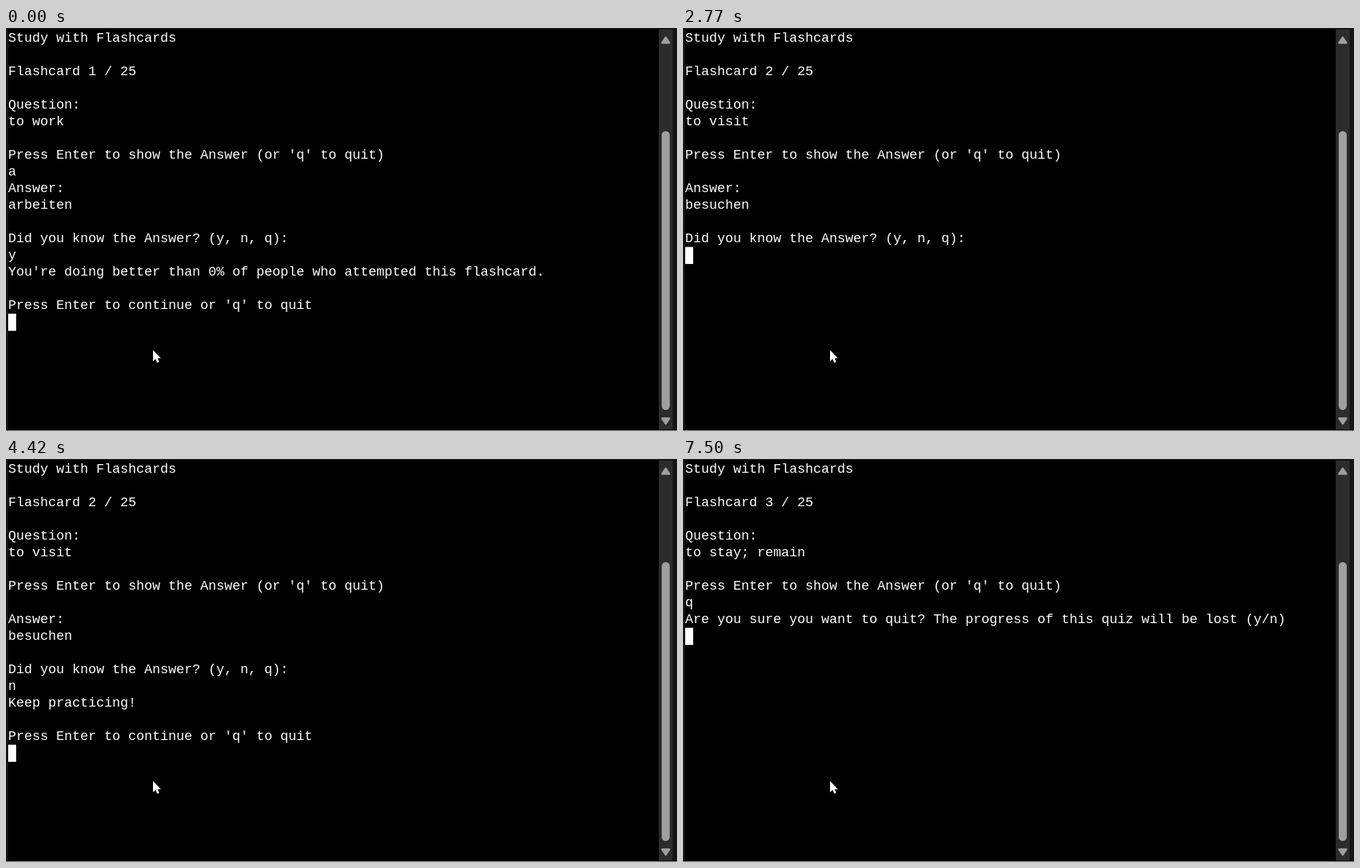
An HTML page with a canvas that plays this animation: 922x555 px, repeating every 8000 ms.

```html
<!DOCTYPE html>
<html lang="en">
<head>
<meta charset="utf-8">
<title>Study with Flashcards</title>
<style>
html, body { margin: 0; width: 100%; height: 100%; overflow: hidden; background: #141414; }
canvas { display: block; }
</style>
</head>
<body>
<canvas id="stage" width="922" height="555"></canvas>
<script>
const ctx = document.getElementById('stage').getContext('2d');
const LOOP = 8000;
const LEFT = 3, CELL = 11, ROW = 23, TOP = 2.5, BASE = 19;

const card = (n, word) => [
  'Study with Flashcards', '', `Flashcard ${n} / 25`, '', 'Question:', word, '',
  "Press Enter to show the Answer (or 'q' to quit)"
];
const answer = word => ['Answer:', word, '', 'Did you know the Answer? (y, n, q):'];
const result = text => [text, '', "Press Enter to continue or 'q' to quit"];

const first = [...card(1, 'to work'), 'a', ...answer('arbeiten'), 'y',
  ...result("You're doing better than 0% of people who attempted this flashcard.")];
const second = card(2, 'to visit');
const shown = [...second, '', ...answer('besuchen')];
const third = card(3, 'to stay; remain');

// The block cursor sits at the end of each screen's last line.
const screens = [
  [0, [...first, '']],
  [500, [...first, '', '']],
  [620, [...second, '']],
  [2770, [...shown, '']],
  [4020, [...shown, 'n']],
  [4420, [...shown, 'n', ...result('Keep practicing!'), '']],
  [5070, [...third, '']],
  [6810, [...third, 'q']],
  [7500, [...third, 'q',
    'Are you sure you want to quit? The progress of this quiz will be lost (y/n)', '']]
];

function rect(color, x, y, w, h) {
  ctx.fillStyle = color;
  ctx.fillRect(x, y, w, h);
}

function poly(color, points) {
  ctx.fillStyle = color;
  ctx.beginPath();
  points.forEach(([x, y]) => ctx.lineTo(x, y));
  ctx.closePath();
  ctx.fill();
}

// Triangle with rounded corners; dir is 1 for up, -1 for down.
function arrow(color, y, dir) {
  poly(color, [[906.5, y - 4 * dir], [911.5, y + 3.5 * dir], [901.5, y + 3.5 * dir]]);
  ctx.strokeStyle = color;
  ctx.lineWidth = 2.5;
  ctx.lineJoin = 'round';
  ctx.stroke();
}

function scrollbar() {
  const gray = '#9f9f9f';
  rect('#2c2c2c', 897, 2, 19, 551);
  ctx.fillStyle = gray;
  ctx.beginPath();
  ctx.roundRect(901, 142, 11, 384, 5.5);
  ctx.fill();
  arrow(gray, 17, 1);
  arrow(gray, 541, -1);
}

function pointer() {
  const shape = [[0, 0], [0, 15.5], [3.5, 12.3], [5.7, 17.4], [8.5, 16.2], [6.4, 11.4], [10.8, 11.2]];
  poly('#fff', shape.map(([x, y]) => [202 + x, 443.5 + y]));
}

function terminal(lines) {
  rect('#000', 3, 2, 894, 551);
  ctx.font = '18.33px "Liberation Mono", "Courier New", monospace';
  ctx.textBaseline = 'alphabetic';
  ctx.fillStyle = '#fff';
  lines.forEach((line, i) => ctx.fillText(line, LEFT, BASE + i * ROW));
  const last = lines.length - 1;
  rect('#fff', LEFT + lines[last].length * CELL, TOP + last * ROW, CELL, ROW + 0.5);
}

function draw(now) {
  const t = now % LOOP;
  const [, lines] = screens.findLast(([start]) => start <= t);
  rect('#141414', 0, 0, 922, 555);
  rect('#909090', 0, 554, 922, 1);
  terminal(lines);
  scrollbar();
  pointer();
}

let start;
function tick(now) {
  start ??= now;
  draw(now - start);
  requestAnimationFrame(tick);
}
draw(0);
requestAnimationFrame(tick);
</script>
</body>
</html>
```
